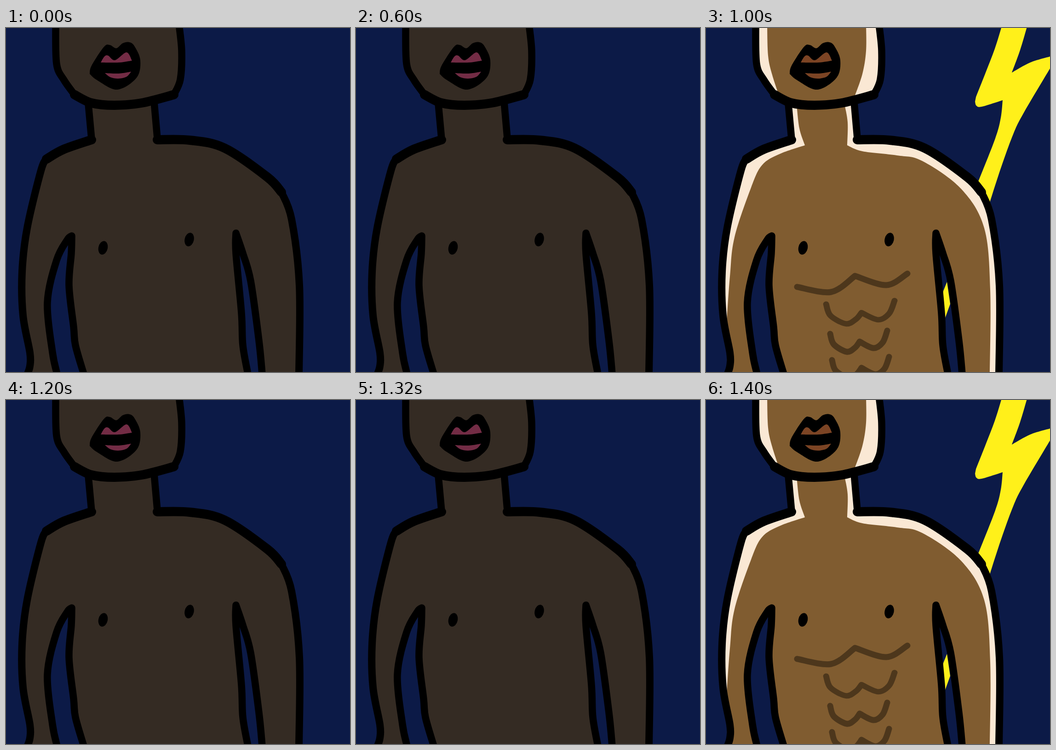
Recreate the animation shown at these times as an HTML page. Size 748 px wide and 748 px high, loop 1.6 s.

```html
<!DOCTYPE html>
<html lang="en">
<head>
<meta charset="utf-8">
<title>Lightning flash</title>
<style>
  html, body { margin: 0; width: 100%; height: 100%; overflow: hidden; background: #0c1a47; }
  svg { display: block; width: 100vw; height: 100vh; }
  #ink path { stroke-linecap: round; stroke-linejoin: round; }
</style>
</head>
<body>
<svg viewBox="0 0 748 748">
  <g id="dim"></g>
  <g id="lit" opacity="0"></g>
  <g id="ink"></g>
</svg>
<script>
const NIGHT = '#0c1a47';
const DIM = { skin: '#342b23', lips: '#732c45' };
const LIT = { skin: '#805c30', lips: '#7c4424', rim: '#fae8d4', bolt: '#fff01a', abs: '#4d371c' };

// Smooth curve through key points; "/" starts a new section with a sharp corner.
function curve(text) {
  return text.split('/').map((part, n) => {
    const p = part.trim().split(/\s+/).map(s => s.split(',').map(Number));
    let d = (n ? 'L' : 'M') + p[0];
    for (let i = 0; i < p.length - 1; i++) {
      const a = p[i - 1] || p[i], b = p[i], c = p[i + 1], e = p[i + 2] || c;
      const c1 = b.map((v, k) => v + (c[k] - a[k]) / 6);
      const c2 = c.map((v, k) => v - (e[k] - b[k]) / 6);
      d += `C${c1} ${c2} ${c}`;
    }
    return d;
  }).join('');
}
const shape = text => curve(text) + 'Z';
const join = (...parts) => parts.join(' / ');
const reverse = text => text.split(/\s+/).reverse().join(' ');
const band = (a, b) => shape(join(a, reverse(b)));

function add(id, tag, attrs) {
  const el = document.createElementNS('http://www.w3.org/2000/svg', tag);
  for (const k in attrs) el.setAttribute(k, attrs[k]);
  document.getElementById(id).append(el);
}
const fill = (id, d, color) => add(id, 'path', { d, fill: color });
const line = (id, text, width, color = '#000', extra = {}) => add(id, 'path', {
  d: curve(text), fill: 'none', stroke: color, 'stroke-width': width,
  'stroke-linecap': 'round', 'stroke-linejoin': 'round', ...extra
});

// Centre lines of the drawing
const cheekL = '108,-9 110,78 126,113 149,145';
const chin = '149,145 186,163 236,168 295,163 365,145';
const cheekR = '365,145 379,112 382,50 376,-9';
const neckL = '179,165 186,241';
const shoulderL = '186,243 125,264 88,285';
const armL = '88,285 76,310 46,435 35,530 37,625 52,706 52,735 46,754';
const neckR = '322,160 329,239';
const shoulderR = '329,243 400,244 475,261 568,324 599,357';
const armR = '599,357 621,416 638,560 637,754';
const pitL = '111,752 101,705 90,597 110,505 133,461 143,452 / 143,452 142,490 137,560 147,650 151,690 169,752';
const pitR = '526,752 515,690 512,620 500,490 500,446 / 500,446 515,490 532,550 550,680 557,752';

const sideL = join(neckL, shoulderL, armL);
const sideR = join(neckR, shoulderR, armR);
const lips = [
  '206,75 214,62 222,60 237,70 262,53 274,71 / 274,71 245,75 206,75',
  '215,98 245,99 272,95 / 272,95 262,106 244,110 227,107 215,98'
];

function figure(id, tone) {
  fill(id, band(sideL, sideR), tone.skin);
  fill(id, shape(join(cheekL, chin, cheekR)), tone.skin);
  for (const gap of [pitL, pitR]) fill(id, shape(gap), NIGHT);
}

figure('dim', DIM);

const bolt = join(
  '642,0 628,45 608,97 587,150', '585,160 588,169 600,171 645,157',
  '645,157 641,195 629,240 592,334', '612,395 641,305 668,231 690,186 748,88',
  '748,62 705,75 665,97', '665,97 683,48 699,-6'
);
fill('lit', shape(bolt), LIT.bolt);
figure('lit', LIT);
fill('lit', 'M524 552L512 582L518 636L531 600Z', LIT.bolt);

// Bright edges run from an inner boundary out to the contour
const rims = [
  ['133,-9 135,60 144,102 160,150', cheekL],
  ['348,-9 348,50 340,100 322,152', reverse(cheekR)],
  ['197,165 203,218 215,255 / 215,255 160,274 122,298 98,347 62,455 52,540 45,638', sideL],
  ['301,165 308,205 307,255 / 307,255 340,268 415,277 470,289 555,350 605,435 618,570 617,754', sideR]
];
for (const [inner, outer] of rims) fill('lit', band(inner, outer), LIT.rim);

// Muscles: one chest line, then the same double cup in three rows
line('lit', '198,563 272,574 324,539 / 324,539 392,559 438,534', 13, LIT.abs);
const cups = '-64,-17 -56,6 -28,22 -10,13 0,0 / 0,0 30,14 50,2 60,-24';
for (const [x, y, size] of [[338, 619, 1.2], [334, 682, 1], [338, 739, 1]]) {
  line('lit', cups, 13 / size, LIT.abs, { transform: `translate(${x} ${y}) scale(${size} ${Math.sqrt(size)})` });
}

// Black line work
for (const part of [neckL, neckR, cheekL, cheekR, pitL, pitR]) line('ink', part, 15.5);
for (const part of [armL, armR]) line('ink', part, 16);
for (const part of [shoulderL, shoulderR, chin]) line('ink', part, 20);
for (const [x, y] of [[211, 478], [398.5, 460]]) {
  add('ink', 'ellipse', { cx: x, cy: y, rx: 10, ry: 15, transform: `rotate(12 ${x} ${y})` });
}

const mouth = shape('182,100 186,82 213,41 226,37 240,44 254,33 268,31 279,39 292,70 284,108 242,134 199,114 182,100');
for (const [id, tone] of [['dim', DIM], ['lit', LIT]]) {
  fill(id, mouth, '#000');
  for (const lip of lips) fill(id, shape(lip), tone.lips);
}

// Two flashes per loop
const steps = [[0, 0], [1000, 1], [1200, 0], [1400, 1], [1600, 1]];
const flash = document.getElementById('lit').animate(
  steps.map(([t, opacity]) => ({ offset: t / 1600, opacity, easing: 'steps(1, end)' })),
  { duration: 1600, iterations: Infinity }
);
flash.startTime = document.timeline.currentTime;
</script>
</body>
</html>
```
